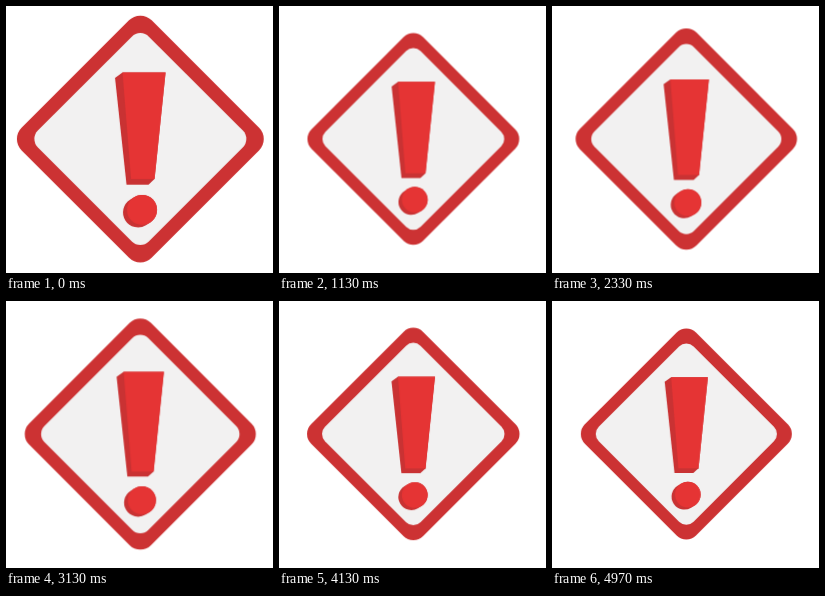
An HTML page for the animation above (5.01 s loop, 267x267 px).

```html
<!DOCTYPE html>
<html lang="en">
<head>
<meta charset="utf-8">
<title>Pulsing warning sign</title>
<style>
  html, body { margin: 0; width: 100%; height: 100%; overflow: hidden; background: #fff; }
  svg { display: block; width: 100vw; height: 100vh; }
  #sign { transform-origin: 134.3px 133px; }
</style>
</head>
<body>
<svg viewBox="0 0 267 267">
  <g id="sign">
    <g transform="translate(134.3 133) rotate(45)">
      <rect x="-91.9" y="-91.9" width="183.8" height="183.8" rx="16" fill="#cc3233"/>
      <rect x="-78.4" y="-78.4" width="156.8" height="156.8" rx="12" fill="#f2f1f1"/>
    </g>
    <!-- darker sides, then the front faces -->
    <g fill="#c93233">
      <path d="M109 72 L116.5 66.5 H159.5 L148.5 173 L142.5 178.5 H120.5 Z"/>
      <path d="M132 206.3 L136 203.8" stroke="#c93233" stroke-width="30" stroke-linecap="round"/>
    </g>
    <g fill="#e53434">
      <path d="M116.5 66.5 H159.5 L148.5 173 H125 Z"/>
      <circle cx="136" cy="203.8" r="15"/>
    </g>
  </g>
</svg>
<script>
  const LOOP = 5010;
  const FRAME = 1000 / 30;
  const BEAT = 420;
  const START = 380; // the loop opens late in a beat, while growing

  // Each beat: settle from the largest size, then swell quickly.
  const pulse = document.getElementById('sign').animate([
    { offset: 0, transform: 'scale(1.097)', easing: 'cubic-bezier(.18, 0, .59, 1)' },
    { offset: 0.698, transform: 'scale(.85)', easing: 'cubic-bezier(.4, 0, .88, 1)' },
    { offset: 1, transform: 'scale(1.097)' }
  ], { duration: BEAT, iterations: Infinity });
  pulse.pause();

  const begin = performance.now();

  function draw() {
    const time = (performance.now() - begin) % LOOP;
    const step = Math.min(149, Math.floor((time + 5) / FRAME));
    pulse.currentTime = START + step * FRAME;
    requestAnimationFrame(draw);
  }
  draw();
</script>
</body>
</html>
```
